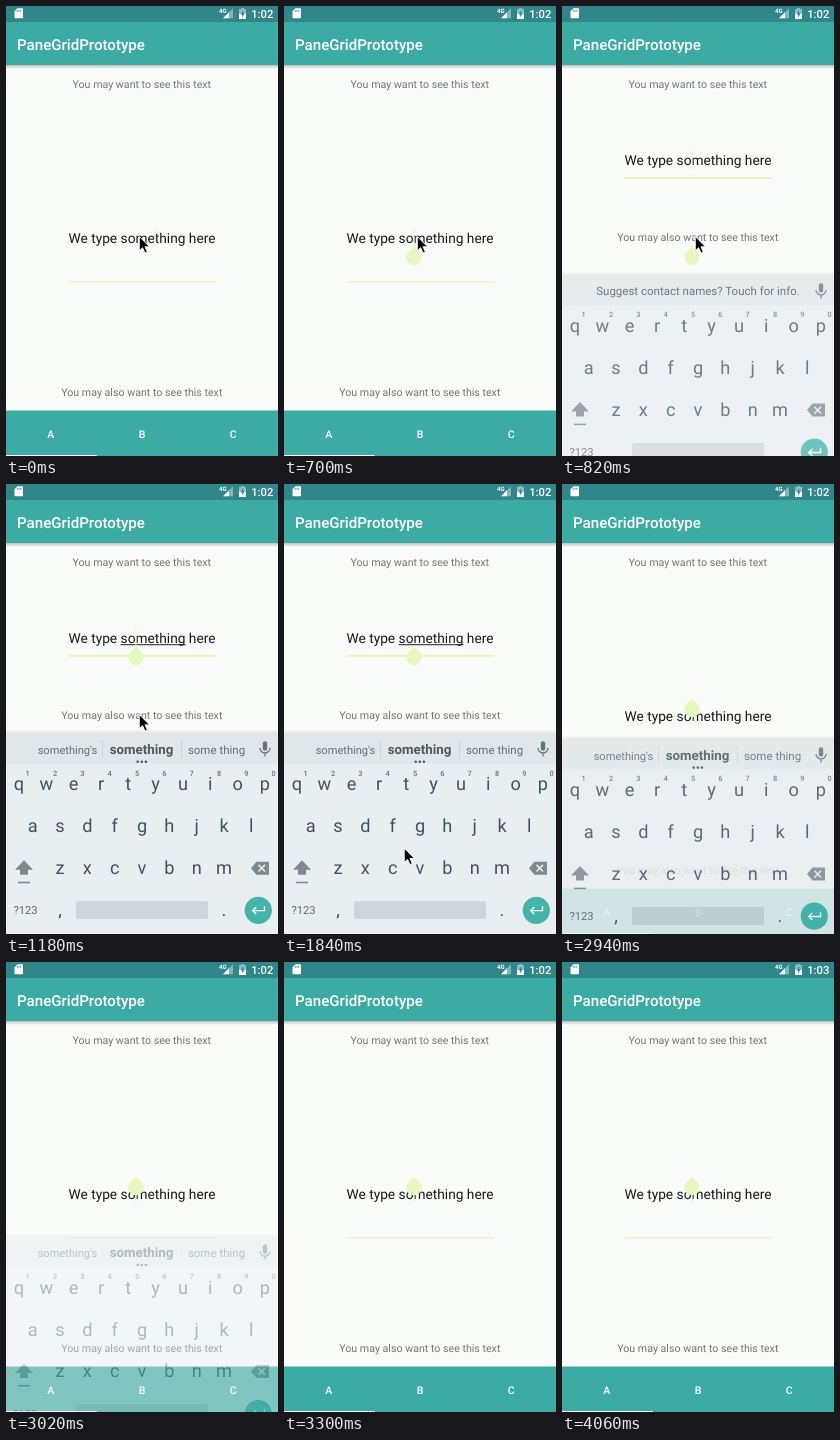
Animation, 272 px wide and 450 px high, one loop 4200 ms. Source, as an HTML page:

```html
<!DOCTYPE html>
<html lang="en">
<head>
<meta charset="utf-8">
<title>Keyboard and tab bar</title>
<style>
html, body { margin: 0; width: 100%; height: 100%; overflow: hidden; background: #fafcfa; }
svg { display: block; width: 100vw; height: 100vh; }
text { font-family: Roboto, sans-serif; white-space: pre; text-rendering: geometricPrecision; }
.mid { text-anchor: middle; }
.med { font-weight: 500; }
.hint { font-size: 10.65px; fill: #727574; }
.key { font-size: 18.2px; fill: #43525a; }
.num { font-size: 7.4px; font-weight: 500; fill: #66737a; }
.word { fill: #626e75; }
</style>
</head>
<body>
<svg viewBox="0 0 272 450" preserveAspectRatio="none">
  <defs>
    <linearGradient id="drop" x2="0" y2="1">
      <stop offset="0" stop-color="#000" stop-opacity=".24"/>
      <stop offset="1" stop-color="#000" stop-opacity="0"/>
    </linearGradient>
    <linearGradient id="rise" x2="0" y2="1">
      <stop offset="0" stop-color="#000" stop-opacity="0"/>
      <stop offset="1" stop-color="#000" stop-opacity=".1"/>
    </linearGradient>
  </defs>

  <rect width="272" height="450" fill="#fafcfa"/>
  <rect y="59" width="272" height="4" fill="url(#drop)"/>
  <rect y="16" width="272" height="43" fill="#3caba4"/>
  <rect width="272" height="16" fill="#30868a"/>
  <text class="med" x="11" y="43.5" font-size="15.1" fill="#fff">PaneGridPrototype</text>

  <g fill="#fff">
    <path d="M11.5 2.3H16.2Q17 2.3 17 3.1V11.5Q17 12.3 16.2 12.3H9.3Q8.5 12.3 8.5 11.5V5.3Z"/>
    <path d="M11.3 3.8V5.8M13 3.8V5.8M14.7 3.8V5.8" stroke="#30868a" stroke-width=".8"/>
    <text x="213" y="6.7" font-size="6" font-weight="700">4G</text>
    <path d="M227 2.3V12.3H217Z" opacity=".4"/>
    <path d="M223 6.3V12.3H217Z"/>
    <path d="M235 3V2H238V3H240V7.5H233V3Z" opacity=".45"/>
    <path d="M233 7.5H240V13H233Z"/>
    <path d="M237.2 4.2L234.6 8.5H236.2V11.6L238.7 7.3H237.2Z" fill="#30868a"/>
    <text id="clock" class="med" x="267.3" y="11.7" font-size="11.2" text-anchor="end"></text>
  </g>

  <text class="mid hint" x="135.8" y="82">You may want to see this text</text>
  <text id="below" class="mid hint" x="135.8">You may also want to see this text</text>
  <rect id="line" x="62.5" width="147.5"/>
  <g id="field">
    <text class="mid" x="136" y="5" font-size="13.72" fill="#161818">We type something here</text>
    <rect id="mark" x="114.5" y="6.2" width="65" height="1" fill="#222"/>
    <rect id="caret" y="-10" width="1.2" height="19" fill="#e6f5cb"/>
  </g>

  <g id="tabs">
    <rect y="404.5" width="272" height="45.5" fill="#3caba4"/>
    <g class="mid med" font-size="10.6" fill="#fff">
      <text x="44.7" y="432">A</text><text x="136" y="432">B</text><text x="227.2" y="432">C</text>
    </g>
    <rect y="449" width="90.7" height="1" fill="#fff"/>
  </g>

  <g id="board">
    <rect y="245.5" width="272" height="4" fill="url(#rise)"/>
    <rect y="249" width="272" height="201" fill="#e9eef1"/>
    <rect y="249" width="272" height="30.5" fill="#e1e6e9"/>
    <text id="ask" class="mid" x="136" y="269" font-size="11.5" fill="#414e55">Suggest contact names? Touch for info.</text>
    <g id="words" class="mid">
      <text class="word" x="61.5" y="270" font-size="11.1">something's</text>
      <text x="135.5" y="270" font-size="13.3" font-weight="700" fill="#4b5960">something</text>
      <text class="word" x="210.5" y="270" font-size="11.5">some thing</text>
      <path d="M96.5 256V274M175.5 256V274" stroke="#cbd2d6"/>
      <g fill="#4b5960"><circle cx="131.7" cy="277.7" r="1.3"/><circle cx="135.8" cy="277.7" r="1.3"/><circle cx="139.9" cy="277.7" r="1.3"/></g>
    </g>
    <g fill="none" stroke="#66737a">
      <path d="M259 259.5V264.5" stroke-width="4.4" stroke-linecap="round"/>
      <path d="M254 264A5 5 0 0 0 264 264M259 269V272.5" stroke-width="1.3"/>
    </g>
    <g id="keys" class="mid"></g>
    <path d="M18 376.2L27 385.7H22V390.7H14V385.7H9Z" fill="#7d898f"/>
    <path d="M12 398.5H24" stroke="#7d898f" stroke-width="1.6"/>
    <path d="M250.5 377.7H263V390.7H250.5L245 384.2Z" fill="#7d898f"/>
    <path d="M252.5 380.9L259 387.5M259 380.9L252.5 387.5" stroke="#e9eef1" stroke-width="1.5"/>
    <text class="mid" x="19.5" y="430.3" font-size="11.2" fill="#5d6a71">?123</text>
    <rect x="70" y="417" width="132" height="18" rx="2" fill="#cfd5d9"/>
    <circle cx="252.3" cy="426.3" r="13.6" fill="#46b3aa"/>
    <path d="M258.5 422.3V426.6H247M250.3 423L246.7 426.6L250.3 430.2" fill="none" stroke="#fff" stroke-width="1.4"/>
  </g>

  <path id="grip" d="M0 -10.6L5.7 -5.3A7.8 7.8 0 1 1 -5.7 -5.3Z" fill="#e3f9c0"/>
  <path id="mouse" d="M0 0V14.2L3.3 11.2L5.7 16.5L8 15.4L5.7 10.3H10.2Z" fill="#000" stroke="#fff" stroke-width=".9"/>
</svg>
<script>
const LOOP = 4200;
const $ = id => document.getElementById(id);
const set = (id, attrs) => {
  for (const k in attrs) $(id).setAttribute(k, attrs[k]);
};
const show = (id, on) => set(id, { visibility: on ? 'visible' : 'hidden' });
const move = (id, x, y) => set(id, { transform: `translate(${x} ${y})` });
const clamp = v => Math.min(1, Math.max(0, v));
const part = (t, start, length) => clamp((t - start) / length);
const within = (t, a, b) => t >= a && t < b;

function addKey(cls, x, y, label) {
  const el = document.createElementNS('http://www.w3.org/2000/svg', 'text');
  el.setAttribute('class', cls);
  el.setAttribute('x', x);
  el.setAttribute('y', y);
  el.textContent = label;
  $('keys').append(el);
}
const PITCH = 27.33;
[['qwertyuiop', 13, 306.3], ['asdfghjkl', 26.7, 348.3], ['zxcvbnm', 54, 390.2], [',', 54, 432], ['.', 218, 432]]
  .forEach(([row, x, y]) => [...row].forEach((c, i) => addKey('key', x + i * PITCH, y, c)));
[...'1234567890'].forEach((c, i) => addKey('num', 21.7 + i * PITCH, 291.5, c));

function draw(t) {
  const up = within(t, 760, 2900);
  const enter = part(t, 740, 260);
  const leave = part(t, 2866, 200) ** 2;
  const suggest = t >= 1000;

  $('clock').textContent = t < 3740 ? '1:02' : '1:03';

  // page layout jumps between its tall and short form
  move('field', 0, up ? 154 : 232);
  set('below', { y: up ? 234.8 : 390 });
  set('line', up
    ? { y: 171, height: 1.8, fill: '#e3f7ba' }
    : { y: 275, height: 1.5, fill: '#eff3c9' });
  show('tabs', !up);
  show('mark', within(t, 1000, 2860));

  const lit = t < 360 || within(t, 600, 1680) || within(t, 2160, 2680)
    || within(t, 2860, 3480) || t >= 4060;
  show('caret', lit);
  set('caret', { x: t < 600 ? 148.5 : 129.3 });

  show('grip', t >= 620);
  move('grip', 130, t < 860 ? 251.3 : up ? 173.3 : 225.5);

  move('board', 0, 42 * ((1 - enter) ** 2 + leave));
  set('board', { opacity: part(t, 740, 107) * (1 - leave) });
  show('ask', !suggest);
  show('words', suggest);

  const slide = 1 - (1 - part(t, 1670, 490)) ** 2.1;
  move('mouse', 133.3 - 48 * slide ** 2.5, 230.5 + 225 * slide);
  show('mouse', t < 2160);
}

const begin = performance.now();
function tick() {
  draw((performance.now() - begin) % LOOP);
  requestAnimationFrame(tick);
}
tick();
</script>
</body>
</html>
```
